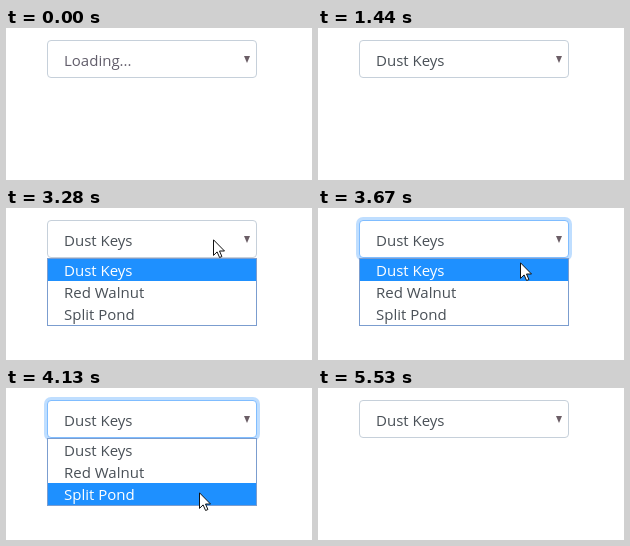
Recreate the animation shown at these times as an HTML page. Size 306 px wide and 152 px high, loop 6.48 s.

```html
<!DOCTYPE html>
<html lang="en">
<head>
<meta charset="utf-8">
<title>Loading a select</title>
<style>
  html, body { margin: 0; width: 100%; height: 100%; overflow: hidden; background: #fff; }
  body { position: relative; font: 15px/22px "Open Sans", "Noto Sans", sans-serif; color: #495057; }
  body * { position: absolute; box-sizing: border-box; white-space: nowrap; }

  /* Every part shares one clock; most changes are hard cuts. */
  .select, .label, .list, .option, .cursor { animation: 6480ms step-end infinite; }

  .select {
    left: 41px; top: 12px; width: 210px; height: 38px;
    border: 1px solid #c6d0da; border-radius: 4px; background: #fff;
    animation-name: focus; animation-timing-function: linear;
  }
  .label { left: 16px; top: 8px; }
  .loading { color: #625e6b; animation-name: loading; }
  .ready { animation-name: ready; }
  .arrow {
    left: 196px; top: 15px; width: 6px; height: 7px;
    background: #6b5e66; clip-path: polygon(0 0, 100% 0, 50% 100%);
  }

  .list {
    left: 41px; top: 50px; width: 210px; height: 68px;
    border: 1px solid #7b9dcf; background: #fff; animation-name: open;
  }
  .option { left: 0; width: 208px; height: 22px; padding-left: 16px; }
  .first { top: 0; animation-name: first; }
  .second { top: 22px; animation-name: second; }
  .third { top: 44px; animation-name: third; }

  .cursor { left: 0; top: 0; width: 12px; height: 19px; animation-name: move; }

  @keyframes loading { 0% { opacity: 1 } 22.22%, 100% { opacity: 0 } }
  @keyframes ready { 0% { opacity: 0 } 22.22%, 100% { opacity: 1 } }
  @keyframes open {
    0% { visibility: hidden }
    50.61% { visibility: visible }
    81.63%, 100% { visibility: hidden }
  }
  @keyframes focus {
    0%, 50.62%, 84.1%, 100% { border-color: #c6d0da; box-shadow: 0 0 0 0 #007bff00; }
    52.93%, 81.63% { border-color: #80bdff; box-shadow: 0 0 0 3px #007bff40; }
  }
  @keyframes first {
    0% { background: #1e90ff; color: #fff }
    58.95%, 100% { background: #fff; color: #495057 }
  }
  @keyframes second {
    0% { background: #fff; color: #495057 }
    58.95% { background: #1e90ff; color: #fff }
    62.5%, 100% { background: #fff; color: #495057 }
  }
  @keyframes third {
    0% { background: #fff; color: #495057 }
    62.5%, 100% { background: #1e90ff; color: #fff }
  }
  @keyframes move {
    0% { transform: translate(320px, 160px) }
    /* passes down the page */
    2% { transform: translate(273px, 54px) }
    3.08% { transform: translate(252px, 98px) }
    4.32% { transform: translate(231px, 140px) }
    5.55% { transform: translate(320px, 160px) }
    /* brushes the right edge */
    32.87% { transform: translate(299px, 127px) }
    33.95% { transform: translate(296px, 110px) }
    35.18% { transform: translate(320px, 160px) }
    /* goes up to the select */
    44.75% { transform: translate(235px, 145px) }
    45.83% { transform: translate(224px, 100px) }
    47.06% { transform: translate(212px, 52px) }
    48.3% { transform: translate(207px, 31px) }
    /* runs down the options */
    54.47% { transform: translate(206px, 35px) }
    55.55% { transform: translate(205px, 42px) }
    56.63% { transform: translate(202px, 54px) }
    57.87% { transform: translate(198px, 69px) }
    58.95% { transform: translate(195px, 80px) }
    60.18% { transform: translate(194px, 86px) }
    61.26% { transform: translate(193px, 92px) }
    62.5% { transform: translate(193px, 99px) }
    63.73% { transform: translate(193px, 104px) }
    66.04% { transform: translate(193px, 105px) }
    /* moves aside and leaves */
    73.14% { transform: translate(214px, 110px) }
    74.38% { transform: translate(245px, 116px) }
    75.77% { transform: translate(271px, 120px) }
    78.08% { transform: translate(279px, 123px) }
    82.87% { transform: translate(276px, 130px) }
    84.1% { transform: translate(272px, 143px) }
    85.33%, 100% { transform: translate(320px, 160px) }
  }
</style>
</head>
<body>
  <div class="select">
    <span class="label loading">Loading...</span>
    <span class="label ready">Dust Keys</span>
    <i class="arrow"></i>
  </div>
  <div class="list">
    <div class="option first">Dust Keys</div>
    <div class="option second">Red Walnut</div>
    <div class="option third">Split Pond</div>
  </div>
  <svg class="cursor" viewBox="0 0 12 19">
    <path d="M.5 .8V16.4L4.1 12.9L6.6 18.5L8.9 17.5L6.5 12H11.5Z" fill="#fff" stroke="#111"/>
  </svg>
</body>
</html>
```
